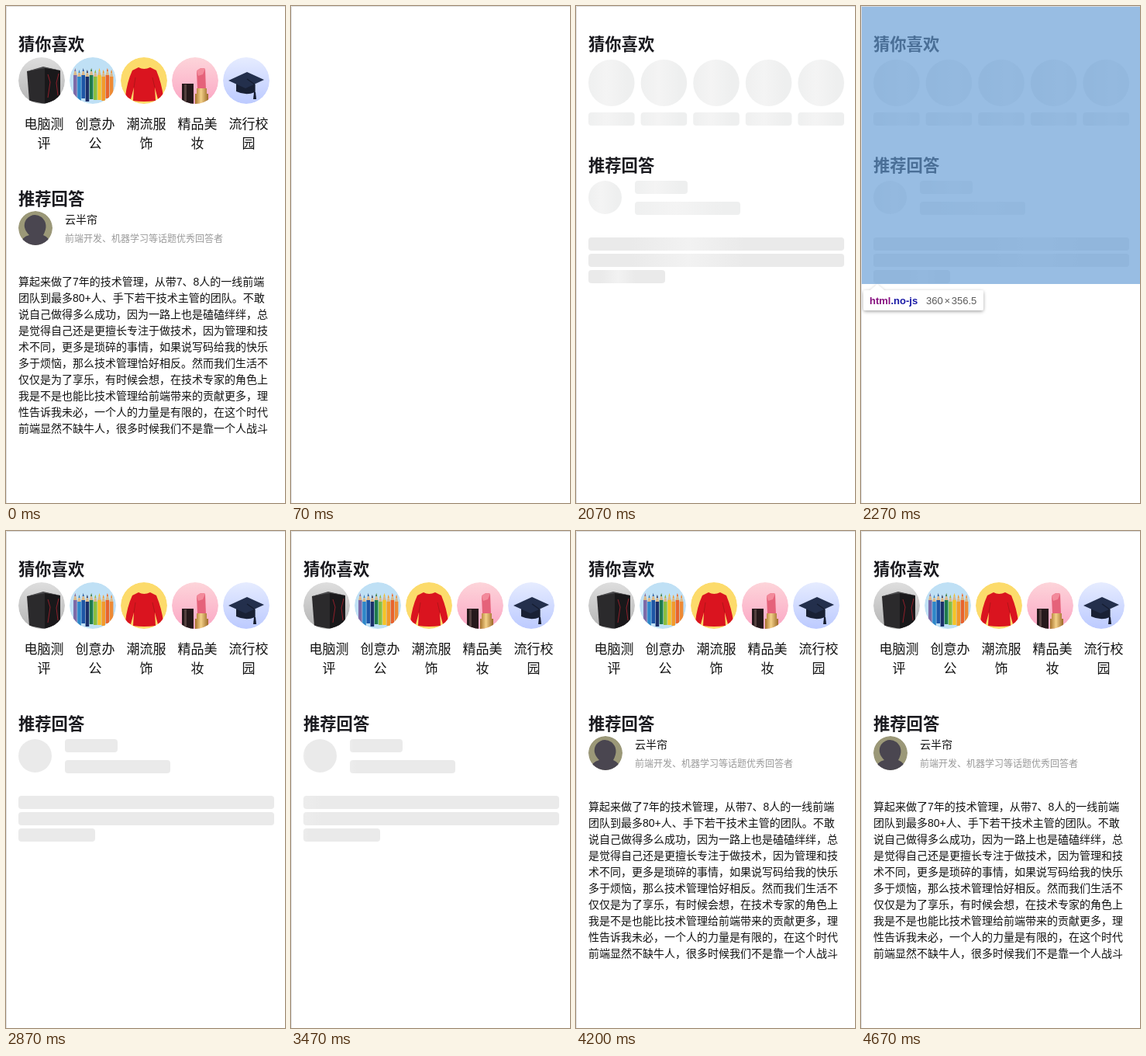
Write an HTML page that moves like this. It is 360x640 px and loops after 4740 ms.

```html
<!DOCTYPE html>
<html lang="zh-CN">
<head>
<meta charset="utf-8">
<title>骨架屏</title>
<style>
html, body { margin: 0; width: 100%; height: 100%; overflow: hidden; background: #fff; }
svg { display: block; width: 360px; height: 640px; }
text { font-family: "Liberation Sans", "Noto Sans CJK SC", "Noto Sans CJK", sans-serif; fill: #121212; white-space: pre; }
.title { font: bold 21.3px "Noto Sans CJK SC", "Noto Sans CJK", sans-serif; fill: #1a1a1f; }
.label { font-size: 17px; text-anchor: middle; }
.body { font-size: 14px; }
.bio { font-size: 12px; fill: #999; }
.tip text { font-size: 13px; }
</style>
</head>
<body>
<svg viewBox="0 0 360 640">
  <defs>
    <clipPath id="disc"><circle r="30"/></clipPath>
    <clipPath id="face"><circle r="22"/></clipPath>
    <linearGradient id="soft" class="shine" x1="-.45" x2=".45">
      <stop offset="0" stop-color="#eeefef"/><stop offset=".5" stop-color="#f4f4f4"/><stop offset="1" stop-color="#eeefef"/>
    </linearGradient>
    <linearGradient id="deep" class="shine" x1="-.22" x2=".22">
      <stop offset="0" stop-color="#eaeaea"/><stop offset=".5" stop-color="#f2f2f2"/><stop offset="1" stop-color="#eaeaea"/>
    </linearGradient>
    <linearGradient id="gray" x2="0" y2="1"><stop stop-color="#dedede"/><stop offset="1" stop-color="#b4b4b4"/></linearGradient>
    <linearGradient id="pink" x2="0" y2="1"><stop stop-color="#fdd5da"/><stop offset="1" stop-color="#fba6c4"/></linearGradient>
    <linearGradient id="blue" x2="0" y2="1"><stop stop-color="#e6ecff"/><stop offset="1" stop-color="#bccaff"/></linearGradient>
    <linearGradient id="gold"><stop stop-color="#a8742c"/><stop offset=".45" stop-color="#f3d088"/><stop offset="1" stop-color="#9c6a28"/></linearGradient>
    <filter id="shadow" x="-20%" y="-40%" width="140%" height="200%">
      <feDropShadow dx="0" dy="1.5" stdDeviation="2.2" flood-opacity=".36"/>
    </filter>
  </defs>

  <g id="heads">
    <text class="title" x="16" y="57">猜你喜欢</text>
    <text class="title" id="second" x="16" y="213">推荐回答</text>
  </g>
  <g id="topBones"></g>
  <g id="lowBones"></g>

  <g id="topics">
    <g transform="translate(46 96)" clip-path="url(#disc)">
      <circle r="30" fill="url(#gray)"/>
      <path d="M-19-12 4-17V30L-16 26Z" fill="#2b2a2c"/>
      <path d="M4-17 24-13V23L4 30Z" fill="#19181a"/>
      <path d="M-19-12 2-18 24-13 4-16Z" fill="#4c4c4e"/>
      <path d="M8-8 11 2 8 22M22-9 19 3 21 19" fill="none" stroke="#8e1f2a"/>
    </g>
    <g transform="translate(112 96)" clip-path="url(#disc)" id="pencils">
      <circle r="30" fill="#bfe0f5"/>
    </g>
    <g transform="translate(178 96)" clip-path="url(#disc)">
      <circle r="30" fill="#fcdb6b"/>
      <path d="M-7-17Q0-13 8-17L16-13Q23 4 25 21L18 24 14 9 15 26Q0 28-14 26L-13 9-17 24-24 21Q-22 2-15-13Z" fill="#da141f"/>
      <path d="M-13 9-11-4M14 9 11-4" stroke="#b01518"/>
    </g>
    <g transform="translate(244 96)" clip-path="url(#disc)">
      <circle r="30" fill="url(#pink)"/>
      <path d="M-17 4H-2V31H-17Z" fill="#26191b"/>
      <path d="M-14 5H-11V31H-14Z" fill="#54403f"/>
      <path d="M2-12Q7-18 13-15L14 11H3Z" fill="#e5627a"/>
      <path d="M2-12Q7-18 13-15L10-8 4-6Z" fill="#f38a9b"/>
      <path d="M2 10H15V17H17V31H0V17H2Z" fill="url(#gold)"/>
    </g>
    <g transform="translate(310 96)" clip-path="url(#disc)">
      <circle r="30" fill="url(#blue)"/>
      <path d="M-13 4H11V15Q0 20-13 14Z" fill="#182034"/>
      <path d="M-23 0 1-11 23-1-1 10Z" fill="#232f4c"/>
      <path d="M1-2 11 5V17" fill="none" stroke="#141b2e" stroke-width="1.2"/>
      <path d="M10 15H12L13 24H9Z" fill="#141b2e"/>
    </g>
  </g>

  <g id="answer">
    <g transform="translate(38 286)" clip-path="url(#face)">
      <circle r="22" fill="#9b9878"/>
      <path d="M-22 22Q-17 11-8 9Q-18-1-12-11Q-3-21 8-14Q18-5 10 9Q18 12 21 22Z" fill="#4a4650"/>
    </g>
    <text class="body" x="76" y="280">云半帘</text>
    <text class="bio" x="76" y="304">前端开发、机器学习等话题优秀回答者</text>
  </g>

  <g id="inspect">
    <path d="M0 0H360V358H0Z" fill="rgba(99,155,213,.66)"/>
    <g class="tip">
      <path d="M6 366H12L21 358.5 30 366H155Q158 366 158 369V389Q158 392 155 392H6Q3 392 3 389V369Q3 366 6 366Z" fill="#fff" filter="url(#shadow)"/>
      <text x="11" y="384" font-weight="bold"><tspan style="fill:#881280">html</tspan><tspan style="fill:#1a1aa6">.no-js</tspan></text>
      <text x="84" y="384" style="fill:#5a5a5a">360<tspan dx="1.7">×</tspan><tspan dx="1.7">356.5</tspan></text>
    </g>
  </g>
  <path d="M.5 640V.5H360" fill="none" stroke="#dcdcdc"/>
</svg>

<script>
const LOOP = 4740;
const SHIFT = 43;
const $ = id => document.getElementById(id);

function add(parent, tag, attrs, content) {
  const el = document.createElementNS('http://www.w3.org/2000/svg', tag);
  for (const k in attrs) el.setAttribute(k, attrs[k]);
  if (content) el.textContent = content;
  parent.append(el);
  return el;
}

const bone = (parent, x, y, width, height, rx, fill) =>
  add(parent, 'rect', { x, y, width, height, rx, fill });

for (let i = 0; i < 5; i++) {
  const x = 16 + 67.6 * i;
  bone($('topBones'), x, 69, 59.6, 60, 30, 'url(#soft)');
  bone($('topBones'), x, 137, 59.6, 17, 4, 'url(#soft)');
}
const low = $('lowBones');
const profile = [
  bone(low, 16, 225, 43, 43, 21.5),
  bone(low, 76, 225, 68, 17, 4),
  bone(low, 76, 252, 136, 17, 4)
];
[330, 330, 99].forEach((w, i) => bone(low, 16, 298 + 21 * i, w, 17, 4, 'url(#deep)'));

['#7d6aa8', '#2e86c8', '#1d55a6', '#1b2f6a', '#1f7a4d', '#8bbf3f', '#f5c327', '#f39a2a', '#e9632c', '#ee8a34'].forEach((fill, i) => {
  const x = -25 + 5.2 * i, y = -7 + i % 2 * 2;
  add($('pencils'), 'path', { d: `M${x} ${y}l2.3-9 2.3 9z`, fill: '#dcb98a' });
  add($('pencils'), 'path', { d: `M${x + 1.3} ${y - 5}l1-4 1 4z`, fill });
  add($('pencils'), 'path', { d: `M${x} ${y}h4.6v${32 - i % 3}h-4.6z`, fill });
});

['电脑测评', '创意办公', '潮流服饰', '精品美妆', '流行校园'].forEach((s, i) => {
  const x = 49 + 66 * i;
  add($('topics'), 'text', { class: 'label', x, y: 158 }, s.slice(0, 3));
  add($('topics'), 'text', { class: 'label', x, y: 183 }, s.slice(3));
});

[
  '算起来做了7年的技术管理，从带7、8人的一线前端',
  '团队到最多80+人、手下若干技术主管的团队。不敢',
  '说自己做得多么成功，因为一路上也是磕磕绊绊，总',
  '是觉得自己还是更擅长专注于做技术，因为管理和技',
  '术不同，更多是琐碎的事情，如果说写码给我的快乐',
  '多于烦恼，那么技术管理恰好相反。然而我们生活不',
  '仅仅是为了享乐，有时候会想，在技术专家的角色上',
  '我是不是也能比技术管理给前端带来的贡献更多，理',
  '性告诉我未必，一个人的力量是有限的，在这个时代',
  '前端显然不缺牛人，很多时候我们不是靠一个人战斗'
].forEach((s, i) => add($('answer'), 'text', { class: 'body', x: 16, y: 360 + 21 * i }, s));

// Start time and visible layers of each stage
const stages = [
  [0, 'heads topics answer'],
  [70, ''],
  [400, 'heads topBones lowBones'],
  [2200, 'heads topBones lowBones inspect'],
  [2870, 'heads topics lowBones'],
  [3600, 'heads topics answer']
];
const layers = ['heads', 'topics', 'answer', 'topBones', 'lowBones', 'inspect'];
const ticks = [1870, 2000, 2070, 2200, 2270];
const shines = document.querySelectorAll('.shine');

// Highlight centre as a fraction of each block's width
function shineAt(t) {
  if (t < 1870) return .66;
  if (t < 2870) return .39 + (ticks.filter(k => k <= t).pop() - 2070) * .00125;
  const step = 200 / 3;
  return -.9 + Math.floor((t - 2870) / step) * step * .00125;
}

function draw(t) {
  const shown = stages.filter(s => s[0] <= t).pop()[1].split(' ');
  for (const id of layers) $(id).style.display = shown.includes(id) ? '' : 'none';
  const dy = shown.includes('topics') ? SHIFT : 0;
  $('second').setAttribute('y', 213 + dy);
  low.setAttribute('transform', `translate(0 ${dy})`);
  for (const el of profile) el.setAttribute('fill', dy ? 'url(#deep)' : 'url(#soft)');
  for (const g of shines) g.setAttribute('gradientTransform', `translate(${shineAt(t)} 0)`);
}

const start = performance.now();
function loop() {
  draw((performance.now() - start) % LOOP);
  requestAnimationFrame(loop);
}
loop();
</script>
</body>
</html>
```
